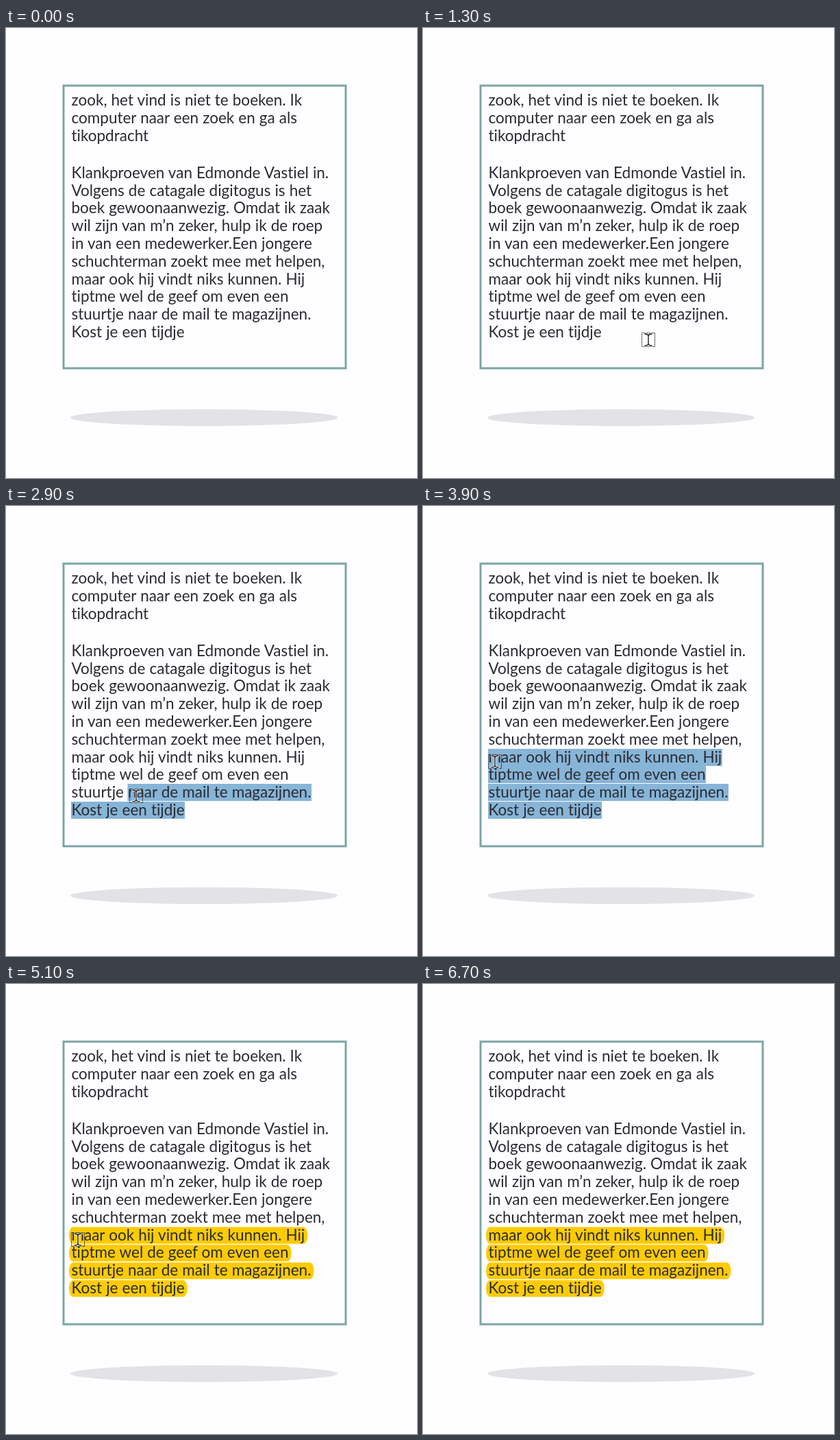
An HTML page that plays this animation: 600x656 px, repeating every 6800 ms.

```html
<!DOCTYPE html>
<html lang="nl">
<head>
<meta charset="utf-8">
<title>Tekst markeren</title>
<style>
  html, body { margin: 0; width: 100%; height: 100%; overflow: hidden; background: #fefdff; }
  svg { display: block; width: 600px; height: 656px; }
  text {
    font: 400 22.5px Lato, "Open Sans", sans-serif; font-variant-ligatures: none;
    word-spacing: 0.3px; fill: #2a2a31; white-space: pre;
  }
  .selection { fill: #87b5d7; }
  .marker { fill: #fecb00; }
  .beam { fill: none; stroke-linecap: round; }
</style>
</head>
<body>
<svg viewBox="0 0 600 656">
  <defs>
    <path id="beam" class="beam" d="M-5-8Q0-8 0-4.5Q0-8 5-8M0-5V6M-5 9Q0 9 0 5.5Q0 9 5 9"/>
  </defs>
  <ellipse cx="289" cy="568" rx="195" ry="12.3" fill="#e3e2e5"/>
  <rect x="84" y="84" width="412" height="412" fill="#fefdff" stroke="#7ba5a4" stroke-width="3"/>
  <g id="bands"></g>
  <g id="lines"></g>
  <g id="cursor">
    <rect x="-9.5" y="-9.5" width="19" height="20" fill="none" stroke="#111" stroke-dasharray="1.5 1"/>
    <use href="#beam" stroke="#fff" stroke-width="3"/>
    <use href="#beam" stroke="#111" stroke-width="1.3"/>
  </g>
</svg>
<script>
const LOOP = 6800, STEP = 100, LEFT = 95.5, LEADING = 25.8;
const MARK_AT = 4600, DRAG_AT = 2200, SHOW_AT = 800, HIDE_AT = 6100;

const intro = ["zook, het vind is niet te boeken. Ik", "computer naar een zoek en ga als", "tikopdracht"];
const body = [
  "Klankproeven van Edmonde Vastiel in.",
  "Volgens de catagale digitogus is het",
  "boek gewoonaanwezig. Omdat ik zaak",
  "wil zijn van m’n zeker, hulp ik de roep",
  "in van een medewerker.Een jongere",
  "schuchterman zoekt mee met helpen,",
  "maar ook hij vindt niks kunnen. Hij",
  "tiptme wel de geef om even een",
  "stuurtje naar de mail te magazijnen.",
  "Kost je een tijdje"
];

// Cursor path: time, x, y
const path = [
  [800, 588, 646], [1300, 329, 454], [2000, 252, 443], [2200, 252, 443],
  [2900, 190, 422], [3600, 105, 372], [5100, 105, 372], [5600, 89, 28]
];

const byId = id => document.getElementById(id);
const bands = byId("bands"), lines = byId("lines"), cursor = byId("cursor");

function add(parent, tag, attrs) {
  const el = document.createElementNS("http://www.w3.org/2000/svg", tag);
  setAttrs(el, attrs);
  parent.append(el);
  return el;
}

function setAttrs(el, attrs) {
  for (const key in attrs) el.setAttribute(key, attrs[key]);
}

function addLine(str, y) {
  const el = add(lines, "text", { x: LEFT, y });
  el.textContent = str;
  return el;
}

intro.forEach((str, i) => addLine(str, 113 + i * LEADING));
const rows = body.map((str, i) => {
  const y = 218.8 + i * LEADING;
  return { str, y, el: addLine(str, y) };
}).slice(-4);

for (const row of rows) {
  row.end = LEFT + row.el.getComputedTextLength();
  row.words = [...row.str.matchAll(/\S+/g)].map(m => row.el.getStartPositionOfChar(m.index).x);
  row.selection = add(bands, "rect", { class: "selection", y: Math.round(row.y - 20), height: 25 });
  row.marker = add(bands, "rect", {
    class: "marker", x: 92, y: row.y - 19.3, width: row.end - 88, height: 24.4, rx: 6, ry: 12
  });
}

function cursorAt(t) {
  const next = path.findIndex(p => p[0] > t);
  if (next < 0) return path[path.length - 1].slice(1);
  if (next === 0) return path[0].slice(1);
  const [t0, x0, y0] = path[next - 1], [t1, x1, y1] = path[next];
  const k = (t - t0) / (t1 - t0);
  return [x0 + (x1 - x0) * k, y0 + (y1 - y0) * k];
}

function show(el, on) {
  el.style.display = on ? "" : "none";
}

function draw(now) {
  const t = Math.floor(now % LOOP / STEP) * STEP;
  const [x, y] = cursorAt(t);
  cursor.setAttribute("transform", `translate(${Math.round(x)} ${Math.round(y)})`);
  show(cursor, t >= SHOW_AT && t < HIDE_AT);

  const marked = t >= MARK_AT, dragging = t > DRAG_AT && !marked;
  const first = rows.findIndex(row => y < row.y + 5.5);
  rows.forEach((row, i) => {
    show(row.marker, marked);
    show(row.selection, dragging && i >= first);
    // The drag snaps to the start of the word under the cursor
    const word = i === first ? row.words.filter(w => w <= x).pop() ?? LEFT : LEFT;
    setAttrs(row.selection, { x: word - 0.5, width: Math.max(0, row.end - word + 1) });
  });
}

const start = performance.now();
function tick() {
  draw(performance.now() - start);
  requestAnimationFrame(tick);
}
tick();
</script>
</body>
</html>
```
